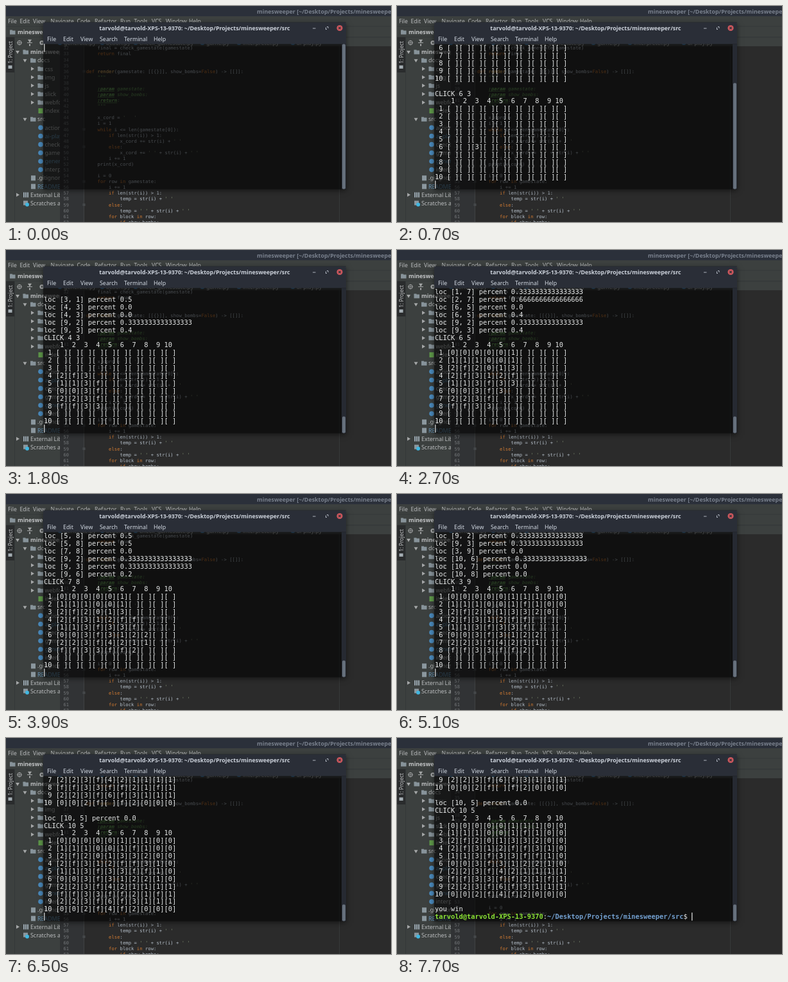
These frames come from a looping animation (600 by 338 pixels, 9700 ms). An HTML page with a canvas:

```html
<!DOCTYPE html>
<html lang="en">
<head>
<meta charset="utf-8">
<title>Minesweeper solver in a terminal</title>
<style>
html, body { margin: 0; width: 600px; height: 338px; overflow: hidden; background: #2b2b2b; }
canvas { display: block; }
</style>
</head>
<body>
<canvas id="stage" width="600" height="338"></canvas>
<script>
const ctx = document.getElementById('stage').getContext('2d');
const LOOP = 9700;
const SANS = '"Noto Sans", "Open Sans", sans-serif';
const MONO = '"DejaVu Sans Mono", monospace';
const USER = 'tarvold';
const HOST = `${USER}@${USER}-XPS-13-9370`;
const PATH = '~/Desktop/Projects/minesweeper/src';

// ---------- Game log ----------
const SIZE = 10;
const mines = new Set(('2,7 3,2 4,2 4,6 4,7 5,4 5,7 5,8 6,4 7,4 8,1 8,2 8,5 8,6 8,9 ' +
  '9,4 9,6 10,4 10,6').split(' '));
const third = 1 / 3;
const CLICKED = null; // stands for the cell about to be opened

// reach: how many columns of each row are known once the phase is over
const phases = [
  { start: 700, slots: 12, step: 100, reach: [0, 0, 0, 3, 4, 4, 4, 4, 0, 0], first: '6,3', last: '4,3',
    locs: [[3, 1, .5], CLICKED, CLICKED, [9, 2, third], [9, 3, .4]] },
  { start: 1900, slots: 9, step: 100, reach: [6, 6, 6, 6, 6, 5, 4, 4, 0, 0], last: '6,5',
    locs: [[1, 7, third], [2, 7, 2 / 3], CLICKED, [6, 5, .4], [9, 2, third], [9, 3, .4]] },
  { start: 2900, slots: 11, step: 100, reach: [6, 6, 6, 7, 7, 8, 8, 7, 0, 0], last: '7,8',
    locs: [[5, 8, .5], [5, 8, .5], CLICKED, [9, 2, third], [9, 3, third], [9, 6, .2]] },
  { start: 4100, slots: 4, step: 200, reach: [8, 7, 8, 7, 7, 8, 8, 7, 0, 0], last: '3,8',
    locs: [[5, 8, .5], [5, 8, .5], CLICKED, [9, 2, third], [9, 3, third], [9, 6, .2]] },
  { start: 4900, slots: 10, step: 100, reach: [10, 10, 10, 10, 10, 10, 10, 10, 9, 3], last: '10,1',
    locs: [[9, 2, third], [9, 3, third], CLICKED, [10, 6, third], [10, 7, 0], [10, 8, 0]] },
  { start: 5900, slots: 7, step: 100, reach: Array(SIZE).fill(10), last: '10,5', locs: [CLICKED] },
];
const postponed = ['9,4', '9,5'];

const range = n => Array.from({ length: n }, (_, i) => i + 1);
const known = new Map();
const log = [];
const marks = []; // log length from a given time on

function countMines(r, c) {
  let n = 0;
  for (let y = r - 1; y <= r + 1; y++)
    for (let x = c - 1; x <= c + 1; x++) n += mines.has(`${y},${x}`);
  return n;
}

function boardLines() {
  const header = '   ' + range(SIZE).map(n => n < 10 ? ` ${n} ` : `${n} `).join('');
  return [header, ...range(SIZE).map(r => String(r).padStart(2) + ' ' +
    range(SIZE).map(c => `[${known.get(`${r},${c}`) ?? ' '}]`).join(''))];
}

function emit(time, lines) {
  log.push(...lines);
  marks.push({ time, length: log.length });
}

function phaseCells(phase, isFinal) {
  const cells = [];
  for (const r of range(SIZE))
    for (const c of range(phase.reach[r - 1])) {
      const key = `${r},${c}`;
      if (!known.has(key) && (isFinal || !postponed.includes(key))) cells.push(key);
    }
  const rank = key => key === phase.first ? -1 : key === phase.last ? 1 : 0;
  return cells.sort((a, b) => rank(a) - rank(b));
}

emit(500, ['', ...boardLines()]);
phases.forEach((phase, p) => {
  const cells = phaseCells(phase, p === phases.length - 1);
  const total = cells.filter(key => !mines.has(key)).length;
  let done = 0;
  for (const key of cells) {
    if (mines.has(key)) { known.set(key, 'f'); continue; }
    const [r, c] = key.split(',').map(Number);
    known.set(key, countMines(r, c));
    const locs = marks.length === 1 ? [] : phase.locs.map(loc => {
      const [y, x, chance] = loc || [r, c, 0];
      return `loc [${y}, ${x}] percent ${chance || '0.0'}`;
    });
    const time = phase.start + phase.step * Math.ceil(done++ * (phase.slots - 1) / (total - 1));
    emit(time, ['', ...locs, `CLICK ${r} ${c}`, ...boardLines()]);
  }
});
const END = 6700;
emit(END, ['', 'you win']);

// ---------- Drawing helpers ----------
function rect(x, y, w, h, color) {
  ctx.fillStyle = color;
  ctx.fillRect(x, y, w, h);
}

function text(str, x, y, color, size = 8.8, style = '', family = SANS) {
  ctx.font = `${style} ${size}px ${family}`;
  ctx.fillStyle = color;
  ctx.fillText(str, x, y);
}

function dot(x, y, radius, color) {
  ctx.fillStyle = color;
  ctx.beginPath();
  ctx.arc(x, y, radius, 0, 7);
  ctx.fill();
}

function stroke(points, color, width = 1) {
  ctx.strokeStyle = color;
  ctx.lineWidth = width;
  ctx.beginPath();
  points.forEach(([x, y], i) => i ? ctx.lineTo(x, y) : ctx.moveTo(x, y));
  ctx.stroke();
}

function folder(x, y) {
  rect(x - 4, y - 3.5, 4, 2, '#87939a');
  rect(x - 4, y - 2.5, 8.5, 6, '#87939a');
}

function arrow(x, y, open) {
  ctx.fillStyle = '#a5a7a8';
  ctx.beginPath();
  const points = open ? [[-3, -2], [3, -2], [0, 3]] : [[-2, -3], [3, 0], [-2, 3]];
  points.forEach(([dx, dy]) => ctx.lineTo(x + dx, y + dy));
  ctx.fill();
}

function clipped(x, y, w, h, draw) {
  ctx.save();
  ctx.beginPath();
  ctx.rect(x, y, w, h);
  ctx.clip();
  draw();
  ctx.restore();
}

// ---------- Editor behind the terminal ----------
const BLUE = '#6897bb';
const PANEL = '#3c403f';
// [level, kind, label, colour]
const tree = [
  [0, 'open', 'minesweeper'], [1, 'open', 'docs'], [2, 'closed', 'css'], [2, 'closed', 'img'],
  [2, 'closed', 'js'], [2, 'closed', 'slick'], [2, 'closed', 'webfonts'], [2, 'html', 'index.html'],
  [1, 'open', 'src'], [2, 'py', 'action.py'], [2, 'py', 'ai-play.py', BLUE],
  [2, 'py', 'check_gamestate.py'], [2, 'py', 'game.py'], [2, 'py', 'generate.py', BLUE],
  [2, 'py', 'interpreter.py'], [1, 'file', '.gitignore'], [1, 'file', 'README.md', BLUE],
  [0, 'library', 'External Libraries'], [0, 'scratch', 'Scratches and Consoles'],
];

const FIRST_LINE = 32;
const code = `    final = check_gamestate(gamestate)
    return final


def render(gamestate: [[{}]], show_bombs=False) -> [[]]:
    """

    :param gamestate:
    :param show_bombs:
    :return:
    """

    x_cord = '   '
    i = 1
    while i <= len(gamestate[0]):
        if len(str(i)) > 1:
            x_cord += str(i) + ' '
        else:
            x_cord += ' ' + str(i) + ' '
        i += 1
    print(x_cord)

    i = 0
    for row in gamestate:
        i += 1
        if len(str(i)) > 1:
            temp = str(i) + ' '
        else:
            temp = ' ' + str(i) + ' '
        for block in row:
            if show_bombs:`.split('\n');

const tokenColors = [
  [/^(def|return|while|if|else|for|in|False)$/, '#cc7832'],
  [/^render$/, '#ffc66d'],
  [/^'/, '#8a9a7c'],
];
const CODE_SIZE = 7.27, CODE_ADVANCE = 4.377;

function codeLine(line, y) {
  const isDoc = /^ +("""|:)/.test(line);
  for (const match of line.matchAll(isDoc ? /\S.*/g : /'[^']*'|\w+|[^\w\s']+/g)) {
    const token = match[0], x = 125 + match.index * CODE_ADVANCE;
    const color = isDoc ? '#629755' : tokenColors.find(([re]) => re.test(token))?.[1] || '#b4bec8';
    text(token, x, y, color, CODE_SIZE, isDoc ? 'italic' : '', MONO);
    const tag = isDoc && token.match(/^:\w+/);
    if (tag) {
      text(tag[0], x, y, color, CODE_SIZE, 'italic bold', MONO);
      rect(x, y + 1, tag[0].length * CODE_ADVANCE, .6, color);
    }
  }
}

function drawTree() {
  tree.forEach(([level, kind, label, color = '#bbbdbf'], i) => {
    const y = 72 + i * 13.15, x = 18 + level * 11.5;
    const folded = kind === 'closed' || kind === 'library';
    if (kind === 'open' || folded) arrow(x, y, !folded);
    if (kind === 'open' || kind === 'closed') folder(x + 12.5, y);
    if (kind === 'py') dot(x + 13, y, 3.8, '#4b8bbe');
    if (kind === 'html') rect(x + 9.5, y - 4, 7, 8, '#5f9a4a');
    if (kind === 'file') rect(x + 9.5, y - 4, 7, 8, '#8b979e');
    if (kind === 'library') for (const k of [0, 1, 2]) rect(x + 9 + k * 3, y - 4, 2, 8, '#9aa7b0');
    if (kind === 'scratch') {
      rect(x + 9, y - 4, 7, 7, '#8b979e');
      dot(x + 15, y + 2, 3, '#40b6e0');
    }
    text(label, x + (level === 0 ? 20 : 19.5), y + 3.2, color, 8.9, i ? '' : 'bold');
  });
}

function drawEditor() {
  rect(0, 0, 600, 338, '#2b2b2b');
  rect(0, 16, 600, 47, PANEL);
  rect(0, 31.5, 600, .7, '#333638');
  rect(0, 48.5, 600, .7, '#2f3234');
  rect(0, 0, 600, 16, '#2b303a');
  text(`minesweeper [${PATH.replace('/src', '')}] - .../src/game.py`, 391, 11.5, '#79808d', 8.9, 'bold');
  const menu = [['File', 3], ['Edit', 21.5], ['View', 42], ['Navigate', 69.5], ['Code', 110.5],
    ['Refactor', 138], ['Run', 178], ['Tools', 199.5], ['VCS', 227], ['Window', 249], ['Help', 285]];
  menu.forEach(([label, x]) => text(label, x, 27, '#bbbdbf', 8.7));

  folder(10, 41);
  text('minesweeper', 18, 44.3, '#c4c6c8', 8.8, 'bold');

  rect(0, 49, 84, 289, PANEL);
  rect(0, 49, 13, 55, '#2a2c2d');
  rect(13, 49, .7, 289, '#323537');
  ctx.save();
  ctx.translate(10, 90);
  ctx.rotate(-Math.PI / 2);
  text('1: Project', 0, 0, '#c4c6c8', 8);
  ctx.restore();
  rect(3.5, 93, 6, 5, '#a2abb1');

  ctx.strokeStyle = '#a5a7a8';
  ctx.lineWidth = 1;
  ctx.beginPath();
  ctx.arc(21, 57.5, 3.2, 0, 7);
  ctx.stroke();
  stroke([[17, 57.5], [25, 57.5]], '#a5a7a8', .7);
  stroke([[21, 53.5], [21, 61.5]], '#a5a7a8', .7);
  rect(33, 57, 8, 1, '#a5a7a8');
  arrow(37, 54.5, true);
  rect(36, 59.5, 2, 3, '#a5a7a8');
  dot(56, 57.5, 3.6, '#a5a7a8');
  dot(56, 57.5, 1.3, PANEL);

  clipped(14, 49, 70, 289, drawTree);

  rect(84, 63, 37, 275, '#313335');
  rect(121, 63, .7, 275, '#4a4c4e');
  rect(519, 63, .7, 275, '#3d3f40');
  const tabs = [['generate.py', 90], ['action.py', 156], ['check_gamestate.py', 208],
    ['game.py', 312], ['interpreter.py', 369], ['ai-play.py', 453]];
  tabs.forEach(([label, x]) => {
    dot(x - 6, 57.5, 3.5, '#4b8bbe');
    text(label, x, 61, '#bbbdbf', 8.9);
  });
  code.forEach((line, i) => {
    const y = 68.4 + i * 9.08;
    text(FIRST_LINE + i, 89.5, y, '#737679', 7, '', MONO);
    codeLine(line, y);
    if (/^( {4})?(def|for|while)|else/.test(line)) rect(119.5, y - 4.5, 4, 4, '#45484a');
  });
}

// ---------- Terminal ----------
const WIN = { x: 58, y: 25.5, w: 472, h: 261 };
const ROWS = 19, ROW_H = 11.89, ADVANCE = 6.25, FONT = 10.38;
const LEFT = 59, TOP = 59.2, BODY_H = 227;

function drawWindow() {
  const { x, y, w, h } = WIN;
  ctx.save();
  ctx.beginPath();
  ctx.rect(0, 0, 600, 338);
  ctx.rect(x, y, w, h);
  ctx.clip('evenodd');
  ctx.shadowColor = 'rgba(0,0,0,.5)';
  ctx.shadowBlur = 8;
  ctx.shadowOffsetY = 2;
  rect(x, y, w, h, '#000');
  ctx.restore();

  rect(x, 59, w, y + h - 59, 'rgba(0,0,0,.62)');
  ctx.fillStyle = '#2a2e37';
  ctx.beginPath();
  ctx.roundRect(x, y, w, 34, [3, 3, 0, 0]);
  ctx.fill();

  ctx.textAlign = 'center';
  text(`${HOST}: ${PATH}`, 294, 37.7, '#ccd2db', 8.9, 'bold');
  ctx.textAlign = 'left';
  const menu = [['File', 64], ['Edit', 89], ['View', 116], ['Search', 146], ['Terminal', 184], ['Help', 230]];
  menu.forEach(([label, mx]) => text(label, mx, 54.5, '#d3dae3', 8.9));

  rect(478, 34.5, 4.5, 1, '#aeb4be');
  stroke([[498.5, 36.5], [498.5, 33.5]], '#aeb4be');
  stroke([[498, 36.5], [500, 36.5]], '#aeb4be');
  stroke([[500, 32.5], [502, 32.5], [502, 35]], '#aeb4be');
  dot(520, 34.5, 4.6, '#cc575d');
  stroke([[518.3, 32.8], [521.7, 36.2]], '#2a2e37', 1.2);
  stroke([[521.7, 32.8], [518.3, 36.2]], '#2a2e37', 1.2);
}

function termText(str, column, row, color = '#e6e8e8', style = '') {
  text(str, LEFT + column * ADVANCE, TOP + 10 + row * ROW_H, color, FONT, style, MONO);
}

function drawScrollbar(lines) {
  const thumb = Math.max(26, BODY_H * Math.min(1, ROWS / lines));
  rect(523, 59.5, 7, BODY_H, '#262a32');
  ctx.fillStyle = '#66707c';
  ctx.beginPath();
  ctx.roundRect(524, 286.5 - thumb, 5, thumb, 2);
  ctx.fill();
}

function drawTerminal(time) {
  const length = marks.reduce((n, mark) => mark.time <= time ? mark.length : n, 0);
  const top = Math.max(0, length + 1 - ROWS);
  log.slice(top, length).forEach((line, row) => termText(line, 0, row));

  const cursorRow = length - top;
  let column = 0;
  if (time >= END) {
    const prompt = [[HOST, '#8ae234', 'bold'], [':', '#e6e8e8', ''], [PATH, '#729fcf', 'bold'], ['$ ', '#e6e8e8', '']];
    for (const [part, color, style] of prompt) {
      termText(part, column, cursorRow, color, style);
      column += part.length;
    }
  }
  const blinkedOff = (time >= 100 && time < 500) || (time >= 7100 && time < 7700);
  if (!blinkedOff) rect(LEFT + column * ADVANCE + .2, TOP + cursorRow * ROW_H, 1.2, 12.5, '#e6e8e8');

  drawScrollbar(length + 1);
}

function frame() {
  const time = performance.now() % LOOP;
  drawEditor();
  drawWindow();
  drawTerminal(time);
  requestAnimationFrame(frame);
}
frame();
</script>
</body>
</html>
```
